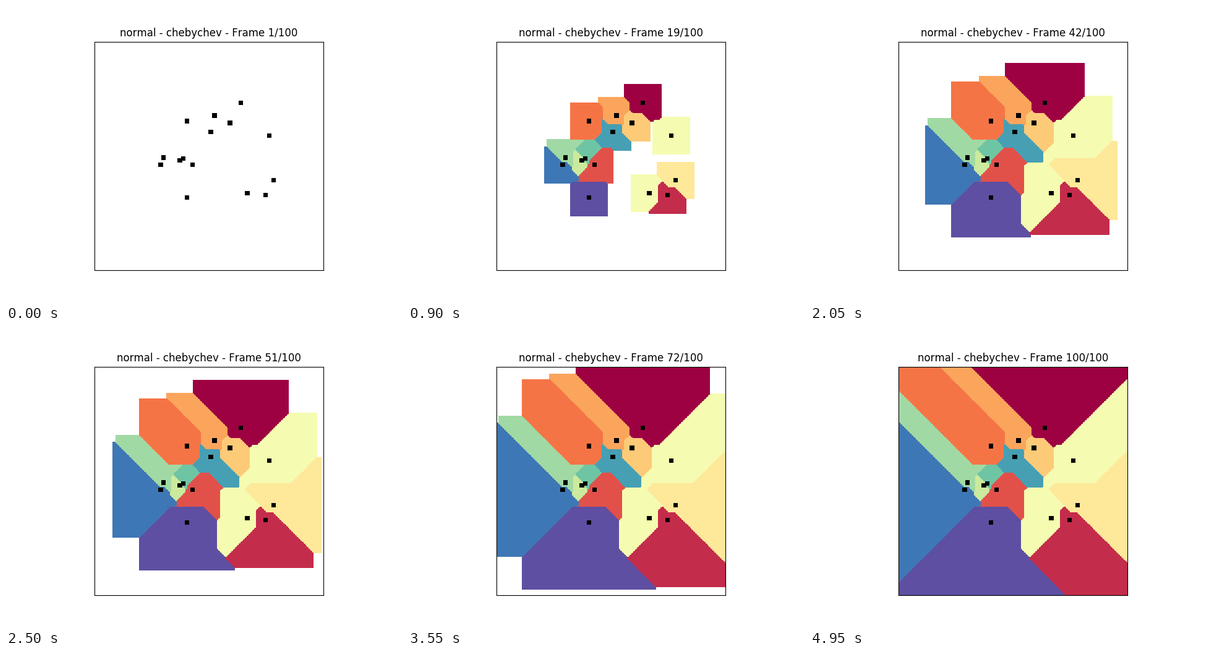
Recreate the animation shown at these times as a matplotlib script. Size 640 by 480 pixels, loop 5 s.

```python
import numpy as np
import matplotlib.pyplot as plt
from matplotlib.animation import FuncAnimation

plt.rcParams["text.kerning_factor"] = 6

FRAMES = 100
SIZE = 251   # cells along each side of the grid
DOT = 2      # reach of the black seed squares, in cells

# Column and row of each seed, in colormap order
SEEDS = [(160, 67), (187, 168), (107, 135), (101, 87), (131, 81),
         (148, 89), (196, 152), (191, 103), (167, 166), (93, 130),
         (75, 127), (97, 128), (127, 99), (72, 135), (101, 171)]

colors = plt.get_cmap("Spectral")(np.linspace(0, 1, len(SEEDS)))[:, :3]
colors[7:9] = colors[7:9].mean(axis=0)  # the two middle cells share a pale yellow

# Chebyshev distance from every cell to every seed
rows, cols = np.indices((SIZE, SIZE))
dist = np.array([np.maximum(abs(cols - c), abs(rows - r)) for c, r in SEEDS])
reach = dist.min(axis=0)
regions = colors[dist.argmin(axis=0)]
regions[reach <= DOT] = 0


def grown(i):
    """Regions after i steps of growing one cell outwards, on white."""
    return np.where((reach <= DOT + i)[..., None], regions, 1.0)


fig, ax = plt.subplots(figsize=(6.4, 4.8), dpi=100)
image = ax.imshow(grown(0), interpolation="nearest")
ax.set(xticks=[], yticks=[])
title = ax.set_title("")


def draw(i):
    image.set_data(grown(i))
    title.set_text(f"normal - chebychev - Frame {i + 1}/{FRAMES}")
    return image, title


anim = FuncAnimation(fig, draw, frames=FRAMES, interval=50, repeat=True, repeat_delay=0)
plt.show()
```
